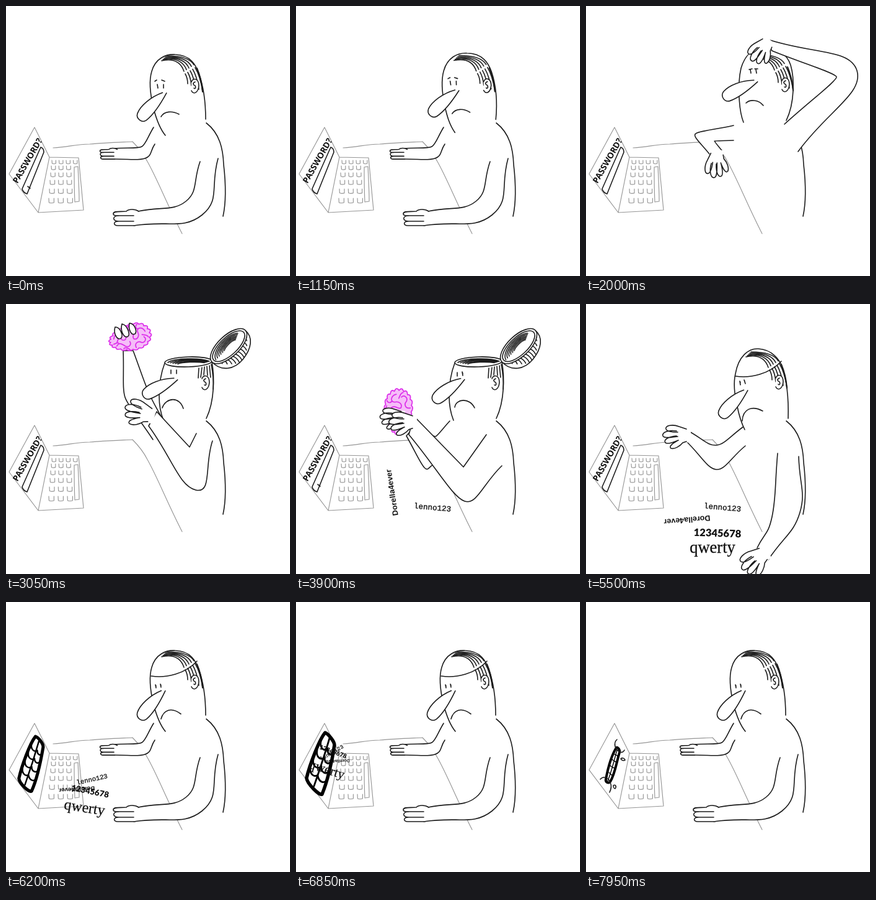
These frames come from a looping animation (458x434 px, 8 s). An HTML page:

```html
<!DOCTYPE html>
<html lang="en">
<head>
<meta charset="utf-8">
<title>Password?</title>
<style>
  html, body { margin: 0; width: 100%; height: 100%; overflow: hidden; background: #fff; }
  svg { display: block; width: 458px; height: 434px; }
  path, ellipse { fill: none; stroke: #1c1c1c; stroke-width: 1.6; stroke-linecap: round; stroke-linejoin: round; vector-effect: non-scaling-stroke; }
  .gray path { stroke: #969696; stroke-width: 1.15; }
  .solid { fill: #fff; }
  .base { fill: #fff; stroke: none; }
  .brain path { stroke: #dc2cea; stroke-width: 1.7; }
  .brain #brainEdge { fill: #f5bdf8; }
  text { fill: #111; text-anchor: middle; dominant-baseline: central; }
</style>
</head>
<body>
<svg viewBox="0 0 458 434">
  <g class="gray">
    <path d="M76 228C100 227 112 222 135 222C160 220 185 219 204 218C214 228 222 238 228 250C244 278 258 315 284 366"/>
    <path class="solid" d="M46 195L5 270L52 332L70 243ZM70 243L117 244L125 328L52 332"/>
    <path id="keys"/>
    <path d="M110 259L116 258C117 278 118 296 118 314L111 315C110 296 110 278 110 259"/>
  </g>
  <g id="prompt">
    <text transform="translate(34.5 248.5) rotate(-60)" font-family="'Noto Sans', sans-serif" font-size="13.5" font-weight="600">PASSWORD?</text>
    <path d="M56 227C59 228 61 231 61 235L34 302C31 301 27 298 26 294Z"/>
    <path id="cursor" d="M35 290L39 293"/>
  </g>
  <g id="mouth">
    <path id="lips" class="solid" style="stroke:#000"/>
    <path id="teeth" style="stroke:#000"/>
    <g id="chew">
      <path d="M50 221C44 226 46 238 55 241C59 243 61 240 62 238M23 285C28 279 36 282 39 290C42 296 40 302 38 306"/>
      <path id="crumbs" d="M64 247C66 245 70 246 71 249C68 251 65 249 64 247M52 290C55 288 58 291 55 295C53 295 52 292 52 290"/>
    </g>
  </g>

  <path id="farArm" class="solid"/>
  <path d="M323 188C345 205 350 230 351 255C355 290 354 320 350 338"/>
  <g id="closed">
    <path id="skull" class="solid"/>
    <g id="hair"><path id="strands"/><path d="M308 100C314 114 316 125 317 138" style="stroke-width:2"/><path id="seam" d="M234 119C258 123 290 115 308 95"/></g>
  </g>
  <g id="open">
    <path class="solid" d="M254 187C248 172 247 160 247 148C247 130 249 113 256 95L332 93C336 115 337 155 323 184"/>
    <ellipse class="solid" cx="294" cy="93" rx="38" ry="8" transform="rotate(-2 294 93)"/>
    <path id="rim"/>
    <path d="M311 103L310 119M316 102L314 118M320 101L319 114M324 100L325 115M328 99L330 118M331 97C334 112 335 124 334 137"/>
  </g>
  <g id="ear">
    <path class="solid" d="M299 122C302 114 311 117 311 128C310 140 302 143 299 136"/>
    <path d="M305 122C300 124 302 127 305 128C307 132 304 134 303 132"/>
  </g>
  <path id="eyes"/><path id="frown"/>
  <path id="nose" class="solid" d="M-2-3C-20-12-42-14-54-9C-62-5-61 7-52 9C-38 11-16 7 2 2"/>
  <g id="lid">
    <path class="solid" d="M0 0C0 22 18 34 40 31C62 28 76 16 74 0"/>
    <path id="lidHatch"/>
    <ellipse class="solid" cx="37" cy="0" rx="37" ry="17"/>
    <ellipse cx="37" cy="0" rx="33" ry="14"/>
    <path id="lidInside"/>
  </g>
  <g id="brain" class="brain">
    <path id="brainEdge"/>
    <path d="M-26-4C-22-14-12-12-14-4C-16 2-8 4-6-2C-6-10 2-16 6-10C10-4 2 0 6 4C12 6 16 0 14-6C14-14 24-12 26-4M-24 8C-18 2-14 8-10 12C-4 16 0 10-2 6M6 18C4 10 12 8 16 12C22 14 26 8 22 4M-14 15C-12 12-6 16-4 20M-8-17C-4-16-4-12-6-10M16-18C12-16 12-12 16-10M-20-8C-18-4-20 0-22 2M0-14C-1-18 4-20 8-18M20 0C24 2 28 2 29 6M-28 4C-24 4-22 2-20 4"/>
  </g>
  <g id="farHand"><path class="base"/><path class="solid"/></g>
  <path id="nearArm" class="solid"/>
  <g id="nearHand"><path class="base"/><path class="solid"/></g>

  <text id="mono" font-family="'Liberation Mono', monospace" font-size="12.5" stroke="#111" stroke-width=".35">lenno123</text>
  <text id="bold" font-family="'Liberation Sans', sans-serif" font-size="12.5" font-weight="700">Dorella4ever</text>
  <text id="digits" font-family="Lato, sans-serif" font-size="16.5" font-weight="900">12345678</text>
  <text id="serif" font-family="'Liberation Serif', serif" font-size="26.5" stroke="#111" stroke-width=".3">qwerty</text>
</svg>
<script>
const LOOP = 8000;
const el = id => document.getElementById(id);
const set = (id, name, value) => el(id).setAttribute(name, value);
const show = (id, on) => { el(id).style.display = on ? "" : "none"; };
const range = (n, f) => Array.from({ length: n }, (_, i) => f(i));
const NUM = /-?(?:\d+\.?\d*|\.\d+)/g;

// Blend two strings that share one structure, number by number.
function mix(a, b, u) {
  const to = b.match(NUM);
  let i = 0;
  return a.replace(NUM, n => " " + (+n + (to[i++] - n) * u).toFixed(2));
}
const ease = u => u * u * (3 - 2 * u);
const ramp = (t, a, b) => ease(Math.min(1, Math.max(0, (t - a) / (b - a))));
function at(track, t) {
  const i = track.findIndex(k => k[0] > t);
  if (i === 0) return track[0][1];
  if (i < 0) return track[track.length - 1][1];
  const [t0, a] = track[i - 1], [t1, b] = track[i];
  return a === b ? a : mix(a, b, ease((t - t0) / (t1 - t0)));
}
const place = (x, y, r = 0, s = 1) => `translate(${x} ${y}) rotate(${r}) scale(${s})`;

// An arm is shoulder, elbow, wrist, wrist, elbow, shoulder, then the roundness of both elbows.
function armPath(pose) {
  const n = pose.match(NUM).map(Number);
  const p = range(6, i => [n[2 * i], n[2 * i + 1]]);
  const mid = (a, b) => [(a[0] + b[0]) / 2, (a[1] + b[1]) / 2];
  const side = (a, e, b, k) => {
    const t = [(b[0] - a[0]) * k, (b[1] - a[1]) * k];
    return `C${mid(a, e)} ${e[0] - t[0]},${e[1] - t[1]} ${e}C${e[0] + t[0]},${e[1] + t[1]} ${mid(e, b)} ${b}`;
  };
  return `M${p[0]}${side(p[0], p[1], p[2], n[12])}L${p[3]}${side(p[3], p[4], p[5], n[13])}`;
}

const near = {
  rest: "313 250 290 314 213 330 206 353 316 336 342 245 .2 .22",
  scratch: "320 190 404 114 300 72 288 52 437 104 342 234 .05 .2",
  lift: "320 190 400 92 336 46 326 24 444 74 342 234 .05 .2",
  flip: "320 190 410 116 388 60 404 44 446 110 342 234 .05 .2",
  clasp: "307 208 296 230 243 173 230 196 306 299 333 220 0 .26",
  hold: "307 210 270 262 190 180 182 210 272 317 332 260 0 .13",
  low: "309 240 300 342 276 392 294 411 345 335 343 245 .2 .2"
};
const far = {
  rest: "238 195 219 226 174 229 170 246 224 245 240 222 .1 .17",
  hang: "238 192 176 206 203 243 222 236 207 217 238 216 .1 .02",
  dip: "254 188 228 130 288 62 272 54 200 140 237 218 .1 .15",
  raise: "254 188 230 142 205 75 189 75 192 150 237 218 .17 .1",
  hold: "248 188 225 213 190 198 178 212 207 263 222 258 .05 .15",
  point: "257 195 210 227 163 203 160 219 210 266 257 228 .15 .15"
};
const hands = {
  flat: ["M8-10L-28-9L-30 11L2 12Z", "M8-11C2-15-8-15-12-11C-22-10-33-12-33-7C-33-3-26-4-20-4L0-4M-24-4C-35-4-35 5-24 5L0 5M-24 5C-34 5-33 12-26 12L2 12"],
  spread: ["M9-11L-14-13L-22 0L-14 13L9 11Z", "M2-10L-10-14C-20-18-33-16-31-10C-29-5-18-5-12-5M-14-7C-26-9-38-5-36 1C-34 6-20 3-12 2M-14 1C-26 2-36 7-32 12C-28 15-18 11-11 8M-13 9C-20 13-27 18-23 21C-17 23-8 17-4 12L2 10"],
  grip: ["", "M-2-12C-12-18-24-14-22-8C-20-2-4-4-2-12M0 0C-10-6-24-3-22 4C-20 9-4 8 0 0M-2 12C-12 7-22 10-21 16C-18 21-5 20-2 12"]
};

const nearTrack = [[0, near.rest], [1640, near.rest], [1950, near.scratch], [2350, near.scratch], [2460, near.lift], [2580, near.flip],
  [2650, near.flip], [2900, near.clasp], [3280, near.clasp], [3550, near.hold], [4700, near.hold], [5050, near.flip], [5150, near.flip],
  [5220, near.lift], [5280, near.scratch], [5480, near.low], [5550, near.low], [5950, near.rest]];
const grab = {
  rest: place(206, 341), scratch: place(291, 61, -48), lift: place(332, 34, -35), flip: place(396, 50, 5),
  clasp: place(230, 178, 18, 1.1), hold: place(186, 190), low: place(284, 403, -36, 1.1)
};
const nearName = pose => Object.keys(near).find(k => near[k] === pose);
const nearHand = nearTrack.map(([t, pose]) => [t, grab[nearName(pose)]]);

const farTrack = [[0, far.rest], [1150, far.rest], [1600, far.hang], [2480, far.hang], [2650, far.dip], [2720, far.dip], [2950, far.raise],
  [3280, far.raise], [3550, far.hold], [4500, far.hold], [4750, far.dip], [4950, far.dip], [5300, far.point], [5550, far.point], [5950, far.rest]];
const flatFar = place(174, 238, 0, .68);
const farHand = [[0, flatFar], [1150, flatFar], [1600, place(211, 240, -82)], [2480, place(211, 240, -82)],
  [2650, place(282, 58, -90)], [2720, place(282, 30, -90)], [2950, place(187, 32, -105)], [3280, place(187, 32, -105)],
  [3550, place(168, 182, 0, .9)], [4500, place(168, 182, 0, .9)], [4750, place(282, 44, -90)], [4950, place(282, 60, -90)],
  [5300, place(160, 211)], [5550, place(160, 211)], [5950, flatFar]];
const brainTrack = [[2600, place(290, 82, 0, .7)], [2740, place(275, 34)], [2950, place(200, 54, -14)], [3280, place(200, 54, -14)],
  [3550, place(165, 173, -88, 1.06)], [4500, place(165, 173, -88, 1.06)], [4750, place(285, 50)], [4950, place(292, 84, 0, .7)]];

const pose = (down, up, raised, hold, shut, glum = down) => [[0, down], [1000, down], [1500, up], [2350, up], [2600, raised], [3300, raised],
  [3600, hold], [4600, hold], [5260, raised], [5460, shut], [5550, shut], [5950, glum]];
const still = (down, up, shut) => pose(down, up, up, up, shut);
const skull = still(
  "M257 208C247 196 242 180 238 165C232 140 231 118 235 105C241 84 258 77 273 78C298 79 306 95 311 108C318 128 322 150 322 182",
  "M254 187C248 172 248 160 247 148C246 130 247 113 250 100C256 80 268 68 285 68C312 66 325 80 330 95C336 115 337 155 323 184",
  "M256 202C250 190 247 180 244 165C238 140 238 125 241 112C246 84 262 71 278 72C300 73 312 90 316 100C323 120 327 150 326 184");
const shift = still(place(0, 0), place(17, -2), place(7, -3));
const nose = pose(place(256, 140, -46), place(274, 121, -27), place(274, 121, -27), place(269, 121, -37), place(258, 139, -46), place(254, 143, -49));
const eyes = pose(
  "M244 126L245 132M254 126L254 132M240 121L243 119M251 119L256 121",
  "M265 102L266 108M274 102L275 108M263 102L268 101M272 101L277 101",
  "M266 106L266 112M275 106L275 112M266 106L266 109M275 106L275 109",
  "M260 110L260 116M268 109L269 115M260 110L260 113M268 109L269 112",
  "M248 124L249 130M255 122L257 128M248 124L249 126M255 122L256 124",
  "M241 133L242 138M249 132L250 137M241 133L242 135M249 132L250 134");
const frown = pose(
  "M250 178C255 169 268 168 279 174", "M258 156C264 150 278 150 286 160",
  "M252 167C258 150 280 148 286 168", "M256 166C258 152 280 150 288 167",
  "M252 188C253 168 268 163 285 172", "M250 188C254 174 266 168 282 180");
const lid = [[2440, "rotate(-180)"], [2580, "rotate(-43)"], [5130, "rotate(-43)"], [5260, "rotate(-180)"]];

const wide = "M47 210C52 212 62 224 62 230C58 258 50 290 42 309C38 312 18 292 17 283C22 262 38 220 47 210Z";
const tight = "M49 234C51 233 55 237 54 242C49 258 47 276 39 289C36 292 31 290 32 285C35 269 39 250 49 234Z";
const wideTeeth = "M54 219C48 240 38 270 29 296M40 224C38 236 46 240 51 236C50 244 56 248 60 242M34 238C32 250 40 255 46 250C46 260 53 262 57 256M28 252C26 264 34 270 41 264C40 274 48 278 53 272M23 266C22 278 30 282 35 278C36 288 43 292 48 288";
const tightTeeth = "M50 238C46 252 42 270 35 288M44 243C46 245 48 246 49 246C50 247 51 248 52 248M42 253C43 254 45 255 46 256C47 256 48 257 49 258M39 263C40 264 42 265 43 266C44 266 46 267 47 268M37 274C38 275 39 276 40 277C41 278 43 279 44 279";

// Each word drops from the brain, lies on the table, then flies into the mouth.
const words = {
  mono: [3620, [place(168, 212, -20, .6), place(220, 328, 5)], 220, place(58, 243, -30, .7)],
  bold: [3650, [place(165, 212, -40, .6), place(155, 303, -99), place(163, 347, -185)], 500, place(66, 256, -182, .55)],
  digits: [4150, [place(170, 212, 50, .6), place(212, 368, 2)], 320, place(60, 240, 20, .6)],
  serif: [4380, [place(170, 212, -60, .6), place(204, 391, 0)], 350, place(50, 269, 18, .8)]
};
for (const id in words) {
  const [start, stops, span, bite] = words[id];
  const track = stops.map((s, i) => [start + span * i / (stops.length - 1), s]);
  track.push([5550, stops[stops.length - 1]], [6850, bite], [7050, place(40, 262, 0, .05)]);
  words[id] = track;
}

set("keys", "d", [251, 260, 271, 283, 297, 312].map((y, r) =>
  range(r ? 3 : 4, c => `M${74 - r + c * (11.5 + r * .7)} ${y - 3}l.4 ${5 + r * .4}q3 1.5 ${6 + r * .4} 0l0 ${-5 - r * .4}`).join("")).join(""));
set("strands", "d", range(5, i =>
  `M${251 + 2 * i} ${88 - 2 * i}C${270 + 4 * i} ${84 - i} ${282 + 4 * i} ${90 - i} ${287 + 4 * i} ${105 - 2.6 * i}` +
  `M${289 + 4 * i} ${109 - 2.5 * i}Q${293 + 5 * i} ${116 - i} ${293 + 6 * i} ${125 + 3 * i}`).join(""));
set("rim", "d", range(5, i => `M${261 + 4 * i} ${94 + i * .6}C${272 + i * 3} ${87 + i * 1.6} ${312 - i} ${86 + i * 1.6} ${328 - 2 * i} ${92 + i * .6}`).join(""));
set("lidHatch", "d", range(13, i => {
  const x = 4 + i * 5.4, dip = Math.sin(Math.PI * (i + 1) / 14);
  return `M${x} ${17 * dip}Q${x + 3} ${23 * dip} ${x + 1} ${31 * dip}`;
}).join(""));
set("lidInside", "d", range(6, i => `M${7 + 4 * i} ${2 - i * .3}C${10 + 4 * i} ${-13 + 2.2 * i} ${50 - i} ${-17 + 2.6 * i} ${62 - 2 * i} ${-5 + i}`).join(""));
set("brainEdge", "d", "M" + range(160, i => {
  const a = i / 80 * Math.PI, r = .94 + .09 * Math.abs(Math.sin(a * 10));
  return [(34 * r * Math.cos(a)).toFixed(1), (24 * r * Math.sin(a) * (.86 + .16 * Math.cos(a))).toFixed(1)];
}).join("L") + "Z");

function setHand(id, kind, transform) {
  const [base, lines] = el(id).children;
  base.setAttribute("d", hands[kind][0]);
  lines.setAttribute("d", hands[kind][1]);
  set(id, "transform", transform);
}

function draw(t) {
  const shaking = t > 3600 && t < 4500;
  const shake = `translate(0 ${shaking ? 6 * Math.sin(t / 100 * Math.PI) : 0}) `;

  set("nearArm", "d", armPath(at(nearTrack, t)));
  set("farArm", "d", armPath(at(farTrack, t)));
  setHand("nearHand", t < 1750 || t > 5750 ? "flat" : "spread", shake + at(nearHand, t));
  const grip = (t > 2600 && t < 3400) || (t > 4600 && t < 5000);
  setHand("farHand", grip ? "grip" : t < 1350 || t > 5750 ? "flat" : "spread", shake + at(farHand, t));

  set("skull", "d", at(skull, t));
  for (const id of ["hair", "ear"]) set(id, "transform", at(shift, t));
  set("nose", "transform", at(nose, t));
  set("eyes", "d", at(eyes, t));
  set("frown", "d", at(frown, t));
  const open = t >= 2440 && t < 5260;
  show("open", open);
  show("closed", !open);
  show("lid", open);
  show("seam", t >= 5260 && t < 7500);
  set("lid", "transform", "translate(332 93) " + at(lid, t));
  show("brain", t >= 2600 && t < 4950);
  set("brain", "transform", shake + at(brainTrack, t));

  for (const id in words) {
    show(id, t >= words[id][0][0] && t < 7050);
    set(id, "transform", at(words[id], t));
  }

  const eating = t >= 6000;
  show("prompt", !eating);
  show("cursor", t % 1200 < 600);
  show("mouth", eating);
  show("chew", t >= 7100);
  const chew = Math.max(0, t - 7150);
  const gape = ramp(t, 6000, 6300) - ramp(t, 6950, 7150) + .12 * (1 - Math.cos(chew / 200 * Math.PI));
  set("lips", "d", mix(tight, wide, gape));
  set("teeth", "d", mix(tightTeeth, wideTeeth, gape));
  el("lips").style.strokeWidth = 4 + gape * 1.5;
  el("teeth").style.strokeWidth = 1.4 + gape * 1.4;
  const fly = (chew % 400) / 400 - 1;
  set("crumbs", "transform", `translate(${fly * 8} ${fly * fly * 5})`);
}

function tick(now) {
  draw(now % LOOP);
  requestAnimationFrame(tick);
}
draw(0);
requestAnimationFrame(tick);
</script>
</body>
</html>
```
